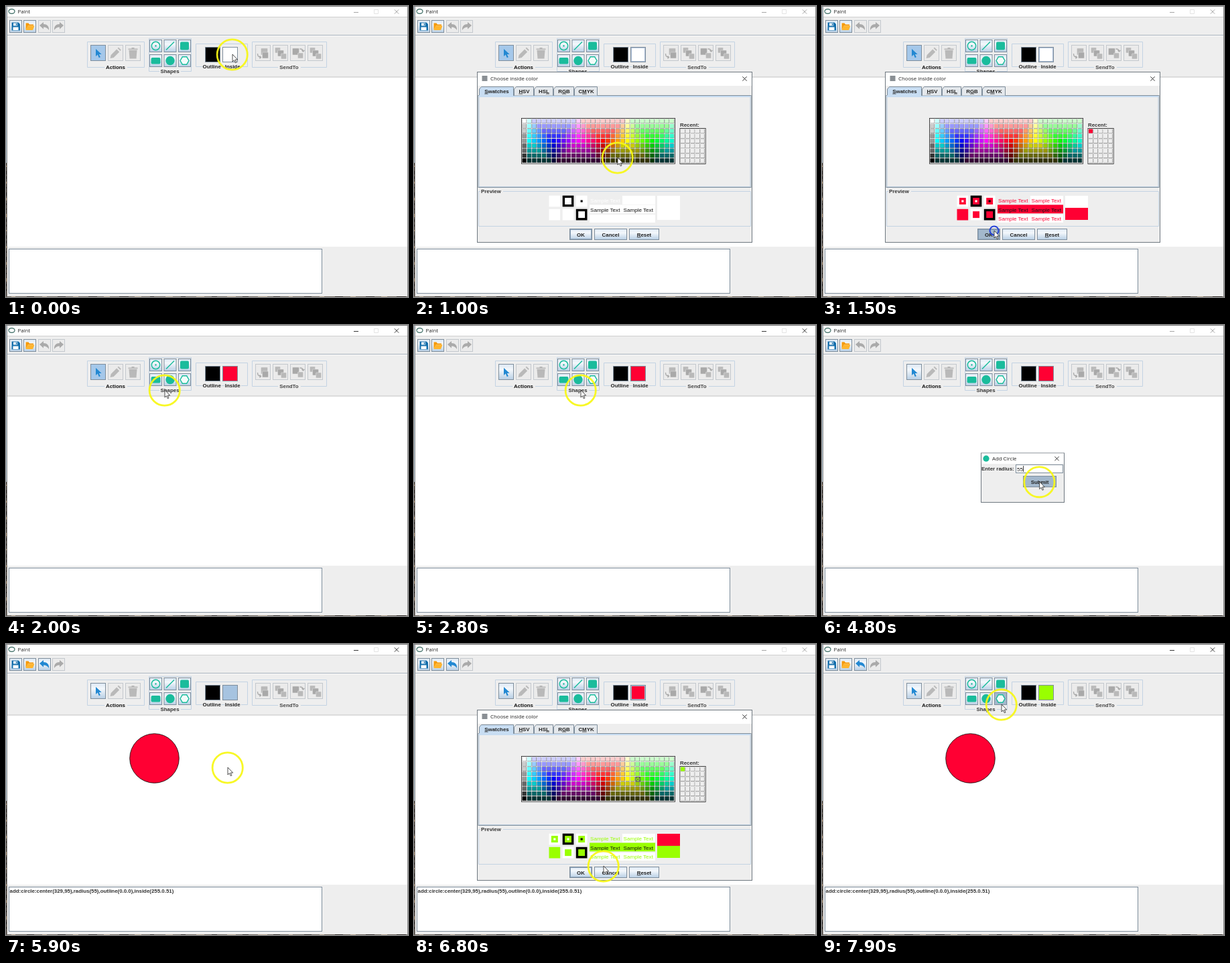
These frames come from a looping animation (600x434 px, 8000 ms). An HTML page:

```html
<!DOCTYPE html>
<html lang="en">
<head>
<meta charset="utf-8">
<title>Drawing window</title>
<style>
html, body { margin: 0; width: 100%; height: 100%; overflow: hidden; background: #fff; }
svg { display: block; width: 600px; height: 434px; }
text { font: 8.1px "Liberation Sans", Arial, sans-serif; fill: #222; white-space: pre; }
.b { font-weight: bold; font-size: 7.9px; }
.ui { font: 7.8px "Open Sans", "Noto Sans", sans-serif; }
.u { text-decoration: underline; }
</style>
</head>
<body>
<svg id="stage" viewBox="0 0 600 434" xmlns="http://www.w3.org/2000/svg"></svg>
<script>
const TEAL = '#1abc9c', EDGE = '#7f8e9c', GREY = '#b9b9b9', PANEL = '#eeeeee', LINE = '#c3d3e3', BLUE = '#2288d2';
const RED = '#ff0033', GREEN = '#99ff00';

// markup helpers
const rect = (x, y, w, h, fill, more = '') =>
  `<rect x="${x}" y="${y}" width="${w}" height="${h}" fill="${fill}" ${more}/>`;
const box = (x, y, w, h, fill, edge, more = '') =>
  rect(x + .5, y + .5, w - 1, h - 1, fill, `stroke="${edge}" ${more}`);
const path = (d, stroke, w = 1, fill = 'none', more = '') =>
  `<path d="${d}" stroke="${stroke}" stroke-width="${w}" fill="${fill}" ${more}/>`;
const dot = (x, y, r, fill, more = '') => `<circle cx="${x}" cy="${y}" r="${r}" fill="${fill}" ${more}/>`;
const text = (x, y, s, cls = 'b', more = '') => `<text x="${x}" y="${y}" class="${cls}" ${more}>${s}</text>`;
const mid = (x, y, s, more = '') => text(x, y, s, 'b', 'text-anchor="middle" ' + more);
const group = (id, body, more = '') => `<g id="${id}" ${more}>${body}</g>`;
const move = (x, y, body) => `<g transform="translate(${x} ${y})">${body}</g>`;
const key = (s, i) => s.slice(0, i) + `<tspan class="u">${s[i]}</tspan>` + s.slice(i + 1);

const button = (x, y, w, h, on = true, id = '') =>
  box(x, y, w, h, on ? 'url(#ocean)' : '#ebebeb', on ? EDGE : '#c3c8cd', id && `id="${id}"`);
const cross = (x, y, r, color = '#222') =>
  path(`M${x - r} ${y - r}l${2 * r} ${2 * r}M${x + r} ${y - r}l${-2 * r} ${2 * r}`, color, .9);

// icons, each around its own centre
const undo = c => path('M-7.500 -2l6 -5v3c5 0 8.500 3 8 9c-2 -3 -4 -4.500 -8 -4.500v3z', 'none', 0, c);
const mirror = s => `<g transform="scale(-1 1)">${s}</g>`;
const floppy = path('M-6 -6h10l2.500 2.500v9.500h-12.500z', 'none', 0, '#1670ad') +
  rect(-3.5, -5, 6, 4, '#fff') + rect(.3, -4.4, 1.5, 2.8, '#1670ad') + rect(-4, 1, 8, 4.5, '#fff');
const folder = path('M-6 5v-10h4l1.500 2h6v2h-8z', 'none', 0, '#f59a0c') +
  path('M-6 5.500l2.500 -6.500h10.500l-2.500 6.500z', 'none', 0, '#ffb52e');
const arrow = path('M-4 -6.500v11l2.800 -2.400l2 4.600l2 -1l-2 -4.300h3.800z', 'none', 0, BLUE);
const pencil = path('M-8 8l1.200 -5l8.500 -8.500l4 4l-8.500 8.500z', 'none', 0, GREY) +
  path('M3 -7l1.500 -1.200l3.800 3.800l-1.200 1.500z', 'none', 0, GREY);
const trash = path('M-6 -4.500h12l-1 12.500h-10z', 'none', 0, GREY) + rect(-7, -7, 14, 1.8, GREY) + rect(-2, -8.5, 4, 2, GREY);
const tile = (x, y, c = GREY, s = 8) => rect(x, y, s, s, c, 'rx="1" stroke="#e4e4e4" stroke-width=".5"');
const back = tile(-3, -7, GREY, 10) + tile(-1, -1, '#a9a9a9', 9) + path('M-8 1c0 4 2 5.500 5 5.500m-2 -2l2 2l-2 2', '#aaa', 1.3);
const steps = tile(-8, -8) + tile(-4, -4, '#a9a9a9', 9) + tile(1, 1);
const front = tile(-8, -7, '#a9a9a9', 10) + tile(0, 0) + path('M3 -6c3 0 5 1 5 4m-2 -2l2 2l2 -2', '#aaa', 1.3);
const shapes = [
  dot(0, 0, 6.2, 'none', `stroke="${TEAL}" stroke-width="1.500"`) + dot(0, 0, 1.2, TEAL),
  path('M-6 6l12 -12', TEAL, 1.4),
  rect(-6.5, -6, 13, 12, TEAL, 'rx="2"'),
  rect(-7, -4.5, 14, 9.5, TEAL, 'rx="2"'),
  dot(0, 0, 6.7, TEAL),
  path('M-6.500 0l3.300 -5.700h6.400l3.300 5.700l-3.300 5.700h-6.400z', TEAL, 1.4, '#f4fbfa')
];

const titleGroup = (x, y, w, h, label, half, color = '#111') => {
  const c = x + w / 2, b = y + h - .5;
  return path(`M${c - half} ${b}H${x + .5}V${y + .5}H${x + w - .5}V${b}H${c + half}`, LINE) +
    (label ? mid(c - .5, b + 2.7, label, `style="fill:${color}"`) : '');
};

function mainWindow() {
  let s = rect(0, 0, 600, 434, '#fff');
  s += rect(0, 0, 1, 234, '#b9cbd8') + rect(0, 234, 1, 200, '#4a4038') + rect(0, 433, 600, 1, '#6d655d');
  for (let i = 0; i < 24; i++) s += rect(0, 238 + i * 8, 1, 2 + i * 7 % 4, i % 3 ? '#1f1b19' : '#a88a6a');
  for (let i = 0; i < 26; i++) s += rect(8 + i * 23, 433, 6 + i * 5 % 9, 1, i % 2 ? '#2c2724' : '#b5a48f');
  s += rect(0, 0, 600, 1, '#777') + rect(1, 0, 1, 433, '#8a8a8a') + rect(599, 0, 1, 434, '#8a8a8a');
  s += `<ellipse cx="8.500" cy="8" rx="4.500" ry="3.400" fill="none" stroke="#37685f" stroke-width="1.200"/>`;
  s += text(17.5, 11.3, 'Paint', 'ui');
  s += path('M519 9.500h7', '#222', .9, 'none', 'class="win"') + path('M549.500 5.500h6v6h-6z', '#dedede', .8) +
    `<g class="win">${cross(583, 8.5, 3.2)}</g>`;
  s += rect(2, 16, 597, 90, PANEL) + rect(2, 16, 597, 1, '#cfcfcf') + rect(2, 43, 597, 1, '#a9b3bd') +
    rect(2, 44, 597, 1, '#fafafa') + rect(2, 105.5, 597, 1, '#c4c4c4');
  s += rect(2, 359, 597, 74, PANEL) + box(4, 362, 468, 67, '#fff', EDGE);

  s += button(5, 21, 19, 19) + move(14.5, 30.5, floppy) + button(26, 21, 19, 19) + move(35.5, 30.5, folder);
  s += button(48, 21, 19, 19, false) + move(57.5, 31, undo('#aaa'));
  s += button(69, 21, 19, 19, false) + move(78.5, 31, mirror(undo('#aaa')));
  s += group('undo', button(48, 21, 19, 19) + move(57.5, 31, undo(BLUE)));

  s += titleGroup(121, 53, 86, 39, 'Actions', 17) + titleGroup(213, 48, 64, 50, 'Shapes', 16, '#333') +
    titleGroup(283, 56, 78, 35, '', 0) + titleGroup(367, 53, 112, 39, 'SendTo', 17, '#444');
  s += rect(293, 86, 29, 8, PANEL) + rect(326, 86, 25, 8, PANEL) + mid(307.2, 93, 'Outline') + mid(338.2, 93, 'Inside');

  s += button(126, 58, 23, 24, true, 'select') + move(138, 70.5, arrow);
  s += button(152, 58, 23, 24, false) + move(163.5, 70, pencil);
  s += button(178, 58, 23, 24, false) + move(189.5, 70.5, trash);
  shapes.forEach((icon, i) => {
    const x = 214 + i % 3 * 21.5, y = i < 3 ? 50 : 72;
    s += button(x, y, 19, 19, true, 'shape' + i) + move(x + 9.5, y + 9.5, icon);
  });
  s += box(297, 61, 23, 23, '#000', EDGE) + box(323, 61, 23, 23, '#fff', EDGE, 'id="inside"') +
    box(324, 62, 21, 21, 'none', '#a9bcd6', 'id="focus"');
  [back, steps, front, steps].forEach((icon, i) => {
    s += button(372 + i * 26, 58, 23, 24, false) + move(383.5 + i * 26, 70, icon);
  });
  s += group('drawn', dot(221.5, 170.5, 36.8, RED, 'stroke="#000" stroke-width=".8"') +
    text(5.6, 371.4, 'add:circle:center(329,95),radius(55),outline(0.0.0),inside(255.0.51)', 'b', 'style="fill:#333"'));
  return s;
}

// one cell of the 31 by 9 palette: grey column, then the hue circle from cyan
function swatch(col, row) {
  if (!col) { const g = [255, 204, 204, 153, 153, 102, 102, 51, 0][row]; return `rgb(${g},${g},${g})`; }
  const wave = shift => {
    const d = Math.abs((col - 1 - shift + 45) % 30 - 15);
    const v = Math.max(0, Math.min(5, 10 - d)) * 51;
    return row < 5 ? Math.max(204 - 51 * row, v) : Math.min(204 - 51 * (row - 5), v);
  };
  return `rgb(${wave(15)},${wave(25)},${wave(5)})`;
}
const STEP = 7.34;
function palette(x, y, cols, rows, color) {
  let s = rect(x, y, cols * STEP + 1.6, rows * STEP + 1.6, '#fff', 'stroke="#222" stroke-width=".8"');
  for (let r = 0; r < rows; r++) for (let c = 0; c < cols; c++) {
    const px = x + 1.1 + c * STEP, py = y + 1.1 + r * STEP;
    s += rect(px, py, 6.6, 6.6, '#777') + rect(px, py, 6, 6, color(c, r));
  }
  return s;
}

function preview() {
  const P = 'currentColor', nest = (x, y, ...fills) =>
    fills.map((f, i) => rect(x + i * 3.4, y + i * 3.4, 16.7 - i * 6.8, 16.7 - i * 6.8, f)).join('');
  let s = nest(201.5, 282.7, '#fff', P, '#fff') + nest(221.7, 282.7, '#000', P, '#fff') + nest(241.8, 282.7, '#fff', P, '#000') +
    nest(201.5, 302.8, P) + nest(221.7, 302.8, '#fff', P) + nest(241.8, 302.8, '#000', P);
  s += rect(311, 283, 49, 13, '#fff') + rect(262, 296.5, 98, 12.8, P) + rect(262, 311, 98, 12, '#fff');
  for (const x of [263, 312.5]) [292.8, 306.8, 320.4].forEach((y, i) => {
    s += text(x, y, 'Sample Text', '', `style="fill:${i === 1 ? '#111' : P}"`);
  });
  return s + rect(363, 283, 34, 18, '#fff', 'id="old"') + rect(363, 301, 34, 18, P);
}

function chooser() {
  let s = box(94, 98, 411, 255, PANEL, '#6f7880') + rect(95, 99, 409, 20, '#fff');
  s += rect(101.5, 104, 8, 8, '#8a8f94') + text(114, 111.2, 'Choose inside color', 'ui') + cross(493.5, 108.5, 3.2);
  const tabs = [[97, 52, 'Swatches', 0], [149, 30, 'HSV', 0], [179, 29, 'HSL', 2], [208, 31, 'RGB', 1], [239, 35, 'CMYK', 1]];
  s += box(95.5, 133, 408, 138, PANEL, EDGE) + rect(96.5, 134, 406, 2, '#c8ddf2') +
    path('M97 136V269.500H502V136', LINE);
  tabs.forEach(([x, w, label, k], i) => {
    s += path(`M${x + .5} 133.500V124l3 -3.500H${x + w - .5}V133.500`, EDGE, 1, i ? '#e4e8ec' : '#c8ddf2');
    s += mid(x + w / 2 + .5, 129.6, key(label, k));
  });
  s += rect(97, 133, 51, 2, '#c8ddf2');
  s += palette(160.5, 167.5, 31, 9, swatch);
  s += group('mark', box(330.5, 198, 7.5, 7.5, 'none', '#555') + cross(334.2, 201.7, 2.6, '#555'));
  s += text(397, 180.3, 'Recent:', 'b', 'style="fill:#333"') + palette(396.9, 182.5, 5, 7, () => PANEL);
  s += rect(398, 183.6, 6, 6, 'currentColor', 'id="recent"');
  s += path('M99 276.500H96.500V328.500H502.500V276.500H133', LINE) + text(100, 279.3, 'Preview', 'b', 'style="fill:#333"') + preview();
  s += button(232, 332, 34, 17, true, 'ok') + box(233, 333, 32, 15, 'none', '#8ba3bb') + mid(249, 343.5, 'OK') +
    button(269, 332, 49, 17) + mid(293.5, 343.5, 'Cancel') + button(321, 332, 45, 17) + mid(343.5, 343.5, key('Reset', 0));
  return s;
}

function radiusDialog() {
  return box(237, 190.5, 125, 74.5, PANEL, '#6f7880') + rect(238, 191.5, 123, 15.5, '#fff') +
    dot(245, 199.2, 4.6, TEAL) + text(254, 202, 'Add Circle', 'ui') + cross(350.5, 199.3, 3.1) +
    text(238, 217.3, 'Enter radius:', 'b', 'style="fill:#333"') + box(289, 208, 71, 13, '#fff', EDGE) +
    text(291, 217.5, '', '', 'id="typed"') + rect(291, 210, .8, 9, '#111', 'id="caret"') +
    button(300, 225, 50, 17, true, 'submit') + mid(325, 236.5, 'Submit');
}

const stage = document.getElementById('stage');
stage.innerHTML = `<defs><linearGradient id="ocean" x1="0" y1="0" x2="0" y2="1">
  <stop offset="0" stop-color="#dde8f3"/><stop offset=".35" stop-color="#f4f8fc"/><stop offset="1" stop-color="#b8cfe5"/>
  </linearGradient></defs>` + mainWindow() + group('chooser', chooser()) + group('radius', radiusDialog()) +
  group('pointer', dot(-.3, .5, 22.6, 'none', 'id="halo" stroke="#f8f814" stroke-width="2.800" stroke-opacity=".92"') +
    dot(0, 0, 6.5, 'none', 'id="tap" stroke="#2340d8" stroke-width="2"') +
    path('M0 0v11l2.500 -2.300l1.800 4l1.700 -.8l-1.800 -3.800h3.500z', '#222', .8, '#fff'));

const $ = id => document.getElementById(id);
const show = (id, on) => $(id).setAttribute('visibility', on ? 'visible' : 'hidden');
const fill = (id, color) => $(id).setAttribute('fill', color);

// pointer stops: time, x, y
const route = [
  [0, 338, 72], [200, 338, 72], [400, 334, 92], [700, 300, 222], [800, 300, 222], [1000, 304, 226], [1100, 304, 226],
  [1300, 276, 203], [1500, 257, 335], [1600, 257, 335], [1800, 248, 205], [2000, 237, 97], [2200, 252, 65],
  [2400, 245, 80], [2600, 248, 103], [2800, 249, 97], [2900, 249, 97], [3000, 222, 170], [4200, 222, 170],
  [4600, 324, 233], [4900, 325, 234], [5500, 335, 74], [5700, 335, 72], [5900, 331, 184], [6300, 334, 201],
  [6400, 334, 201], [6600, 340, 193], [6700, 340, 193], [6800, 283, 331], [7000, 251, 339], [7200, 249, 340],
  [7300, 249, 340], [7700, 266, 81], [7800, 267, 84], [7900, 268, 90], [8000, 268, 90]
];
const taps = [100, 1300, 1500, 2400, 3200, 4700, 5600, 6400, 7200, 7700];

function draw(t) {
  const within = (a, b) => t >= a && t < b;
  const pressed = (id, on) => fill(id, on ? '#a3b8cc' : 'url(#ocean)');
  const choosing = within(300, 1600) || within(6000, 7400), asking = within(3400, 4900);
  const picked = t < 1300 ? '#fff' : t < 6400 ? RED : GREEN;
  const inside = t < 1600 ? '#fff' : t < 7400 ? RED : GREEN;

  show('chooser', choosing);
  show('radius', asking);
  $('chooser').style.color = picked;
  fill('old', t < 4000 ? '#fff' : RED);
  $('recent').style.display = within(1300, 6000) || t >= 6400 ? '' : 'none';
  $('mark').style.display = within(6400, 7200) ? '' : 'none';
  $('caret').style.display = within(3800, 4000) ? 'none' : '';
  const typed = t < 4100 ? '' : t < 4300 ? '5' : '55';
  $('typed').textContent = typed;
  $('caret').setAttribute('x', 291 + typed.length * 4.5);

  show('undo', t >= 4900);
  show('drawn', t >= 4900);
  show('focus', choosing);
  fill('inside', within(200, 300) || within(5700, 6000) ? '#a6c3e0' : inside);
  fill('select', t < 2400 ? '#a5c8ea' : 'url(#ocean)');
  pressed('shape4', within(2400, 2600));
  pressed('shape5', t >= 7700);
  pressed('ok', within(1500, 1600) || within(7200, 7400));
  pressed('submit', within(4700, 4900));
  const active = !choosing && !asking && t >= 200;
  document.querySelectorAll('.win').forEach(e => e.setAttribute('opacity', active ? 1 : .45));

  const i = Math.max(1, route.findIndex(p => p[0] >= t));
  const [a, x, y] = route[i - 1], [b, u, v] = route[i], k = (t - a) / (b - a);
  $('pointer').setAttribute('transform', `translate(${x + (u - x) * k} ${y + (v - y) * k})`);
  const tap = taps.includes(t);
  show('tap', tap);
  show('halo', !tap);
}

const start = performance.now();
function tick() {
  draw(Math.floor((performance.now() - start) % 8000 / 100) * 100);
  requestAnimationFrame(tick);
}
draw(0);
requestAnimationFrame(tick);
</script>
</body>
</html>
```
